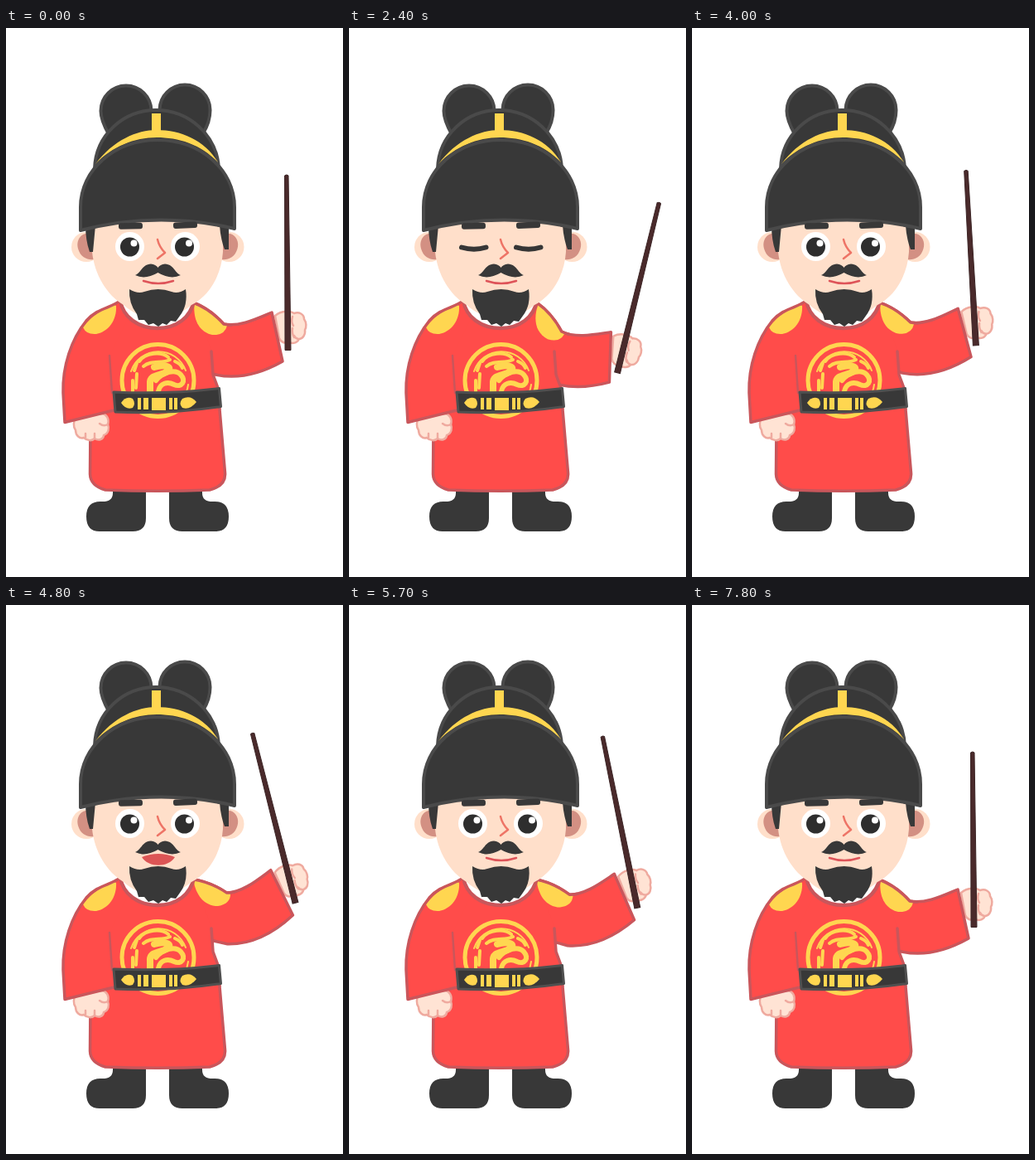
Recreate the animation shown at these times as an HTML page. Size 407 px wide and 662 px high, loop 8 s.

```html
<!DOCTYPE html>
<html lang="en">
<head>
<meta charset="utf-8">
<title>King with a pointer</title>
<style>
  html, body { margin: 0; width: 100%; height: 100%; overflow: hidden; background: #fff; }
  svg { display: block; width: 407px; height: 662px; }
  .line { fill: none; stroke-linecap: round; stroke-linejoin: round; }
  .red { fill: #ff4c4a; }
  .edge { stroke: #c9565b; stroke-width: 3.5; stroke-linecap: round; stroke-linejoin: round; }
  .gold { fill: #ffd650; }
  .dark { fill: #383838; }
  .hat { fill: #383838; stroke: #4a4a4a; stroke-width: 4; stroke-linejoin: round; }
  .skin { fill: #ffdfca; }
  .hand { fill: #ffe3d4; stroke: #efaa9f; stroke-width: 2.5; stroke-linejoin: round; stroke-linecap: round; }
  .goldline { stroke: #ffd650; }
</style>
</head>
<body>
<svg viewBox="0 0 407 662">
  <!-- boots -->
  <g class="dark">
    <path id="boot" d="M129 552H169V591Q169 607 153 607H113Q97 607 97 589Q97 571 114 571Q129 572 129 561Z"/>
    <use href="#boot" transform="translate(366 0) scale(-1 1)"/>
  </g>

  <!-- raised arm, behind the robe -->
  <g class="arm">
    <path class="hand" d="M325 347C333 340 344 341 348 344C354 342 360 345 360 351C363 355 363 361 361 364C362 370 358 375 354 375C351 381 344 381 340 378C337 381 332 379 330 374Z"/>
    <path class="hand line" style="fill:none" d="M346 348Q344 354 347 359M346 362Q345 368 348 373M353 375Q349 374 348 371"/>
    <path d="M336.500 178Q339 176 341 178L344 388.500H337Z" fill="#4a2a2b" stroke="#3c2526"/>
    <path class="red edge" d="M224 330C242 337 254 347 263 357C282 361 304 350 321 343L334 402C309 416 279 425 249 417L215 400Z"/>
  </g>

  <!-- robe -->
  <path class="red" d="M139 328L226 331L247 385L250 418L258 437L258 460L264 536Q266 551 246 556Q183 560 119 556Q102 552 102 538V440L100 370Z"/>
  <path class="line edge" d="M248 390L250 418L257 437L258 460L264.500 536Q266 552 246 557Q183 559.500 120 557Q102 552 101.500 538L102 478"/>
  <g class="arm">
    <path class="red" d="M222 334L228 331C243 337 255 348 263 357L248 372L232 362Z"/>
    <path class="gold" d="M227.500 333C243 339 256 349 267 359Q264 371 249 370C232 366 226 350 227.500 333Z"/>
    <path class="line edge" d="M226 331C242 337 254 347 263 357Q267 358 272 358"/>
  </g>

  <!-- lowered arm -->
  <path class="hand" d="M85 468C81 474 81 481 84 485C84 491 89 496 94 494C98 498 104 498 107 495C112 498 118 496 118 491C124 489 125 482 123 478C125 472 122 466 116 465Z"/>
  <path class="hand line" style="fill:none" d="M113 477Q118 481 123 478M96 489V494M107 489V494"/>
  <path class="red" d="M139 328C127 338 111 337 97 353C79 375 68 408 69 440L71 475.500L130 461L128 440L125 395L150 345Z"/>
  <path class="gold" d="M131 334C118 338 104 346 93 361Q97 370 109 369C124 366 134 352 133 335Z"/>
  <path class="line edge" d="M139 328C127 338 111 337 97 353C79 375 68 408 69 440L71 475.500L130 461"/>
  <path class="line edge" style="stroke-width:2.500" d="M125 395L128 440"/>

  <!-- emblem -->
  <g class="line goldline">
    <circle cx="183.500" cy="425" r="43.500" stroke-width="5"/>
    <path stroke-width="2" d="M151 414A35 35 0 0 1 217 413M220 430A37 37 0 0 1 212 449"/>
    <path stroke-width="4" d="M161 402C168 391 188 390 196 397M166 408C175 400 188 405 198 400"/>
    <path stroke-width="8" d="M179 409C192 405 202 409 195 414C187 420 173 417 174 429V440"/>
    <path stroke-width="6" d="M181 425C190 414 205 411 211 418C218 426 212 434 203 430C195 426 186 428 184 438"/>
    <path stroke-width="4" d="M153 425V438M158 417L157 434M158 404L155 413M204 402Q211 405 213 410"/>
  </g>

  <!-- belt -->
  <path class="dark" stroke="#505050" stroke-width="3" stroke-linejoin="round" d="M130 439Q195 442 257.500 434.500L259.500 456.500Q196 466 132 463Z"/>
  <g class="gold">
    <path d="M139 452Q145 443 153 447Q157 453 153 458Q145 461 139 452Z"/>
    <path d="M230 451Q223 442 213 447Q208 453 213 458Q222 461 230 451Z"/>
    <path d="M159 446H163V460H159ZM166 446H172V460H166ZM176 446H193V461H176ZM197 446H201V460H197ZM203 446H207V460H203Z"/>
  </g>

  <!-- collar and face -->
  <path d="M138 327C141 347 160 361 183 361C206 361 223 348 226 328Z" fill="#fff"/>
  <path class="line edge" style="stroke-width:4.500" d="M138 328C141 349 160 362 183 362C206 362 223 349 227 329"/>
  <g id="ear">
    <ellipse class="skin" cx="97" cy="264" rx="18" ry="18"/>
    <path d="M106 249C91 244 84 256 87 266C90 277 99 280 106 279Z" fill="#d39083"/>
  </g>
  <use href="#ear" transform="translate(366.500 0) scale(-1 1)"/>
  <path class="skin" d="M104 225H262V270C260 300 244 324 224 334Q205 350 183 350Q160 350 142 334C122 322 107 298 104 270Z"/>
  <path class="dark" d="M96 238H108L105 270H101Q96 256 96 238ZM258 238H269V267H264Q259 254 258 238Z"/>

  <!-- hat -->
  <path class="hat" d="M124 128C119 119 114.500 110 114.500 100A30.500 30.500 0 0 1 175.500 100L172 114ZM238 127C243 119 246.500 110 246.500 99A30.500 30.500 0 0 0 185.500 99L189 114Z"/>
  <path class="hat" d="M107 170C108 129 142 99 181 99C221 99 255 129 257 170Z"/>
  <path class="gold" d="M176 103H187V127H176Z"/>
  <path class="gold" d="M108 164C130 135 158 123 182 123C211 123 240 135 256 162C235 140 208 132 182 132C155 132 128 143 108 164Z"/>
  <path class="hat" d="M90 244V216C90 171 131 135 183 135C235 135 276 171 276 216V242Q184 220 90 244Z"/>

  <!-- features -->
  <g class="dark">
    <rect x="136" y="235" width="29" height="7.500" rx="3" transform="rotate(-1 150 239)"/>
    <rect x="202" y="234" width="29" height="7.500" rx="3" transform="rotate(-2 216 238)"/>
  </g>
  <g id="open">
    <circle cx="149.500" cy="263.500" r="17.500" fill="#fff"/>
    <circle cx="216.500" cy="263.500" r="17.500" fill="#fff"/>
    <circle cx="149.500" cy="264" r="11.500" fill="#2e2e2e"/>
    <circle cx="215.500" cy="264" r="11.500" fill="#2e2e2e"/>
    <circle cx="154.500" cy="259.500" r="4" fill="#fff"/>
    <circle cx="221" cy="259.500" r="4" fill="#fff"/>
  </g>
  <path id="shut" class="line" stroke="#363636" stroke-width="6" d="M136 264.500Q151 269 165.500 264.500M202 264.500Q217 269 231.500 264.500"/>
  <path class="line" stroke="#ee7466" stroke-width="2.500" d="M183 255Q185 264 192 271L183 278"/>
  <path class="dark" d="M149 315Q159 321 167 318Q184 312 200 318Q208 321 217 315Q220 334 210 347L205 354L199 353L194 358L189 356L184 360L178 356L172 358L167 352L160 352L158 345Q148 332 149 315Z"/>
  <path id="smile" class="line" stroke="#de5459" stroke-width="2.500" d="M166 305Q184 311 202 305"/>
  <path id="talk" fill="#dc5555" d="M164 304Q174 300 184 300Q194 300 204 304C196 317 172 317 164 304Z"/>
  <path class="dark" d="M156 298C163 296 164 285 175 284.500Q181 285 183.500 289Q186 285 192 284.500C203 285 204 296 211 298Q199 304 183.500 295Q168 304 156 298Z"/>
</svg>
<script>
  const LOOP = 8000, STEP = 100;
  const SHOULDER = "224 336.5";
  const swing = [[0, 0], [1100, 0], [2600, 16.5], [5150, -18.6], [6500, 0], [LOOP, 0]];
  const blinks = [[2400, 3000], [6600, 7200]];
  const speech = [[300, 700], [1400, 1800], [2600, 3000], [3600, 4000], [4600, 5000], [5900, 6300], [7400, 7800]];

  const byId = id => document.getElementById(id);
  const arms = document.querySelectorAll(".arm");
  const within = (spans, t) => spans.some(([from, to]) => t >= from && t < to);
  const show = (id, on) => byId(id).setAttribute("visibility", on ? "visible" : "hidden");

  function angleAt(t) {
    const i = swing.findIndex(([time]) => time > t);
    const [t0, a0] = swing[i - 1], [t1, a1] = swing[i];
    return a0 + (a1 - a0) * (t - t0) / (t1 - t0);
  }

  function draw(now) {
    const t = Math.floor((now % LOOP) / STEP) * STEP;
    const blink = within(blinks, t), talk = within(speech, t);
    arms.forEach(arm => arm.setAttribute("transform", `rotate(${angleAt(t)} ${SHOULDER})`));
    show("open", !blink);
    show("shut", blink);
    show("smile", !talk);
    show("talk", talk);
  }

  const start = performance.now();
  function tick() {
    draw(performance.now() - start);
    requestAnimationFrame(tick);
  }
  tick();
</script>
</body>
</html>
```
